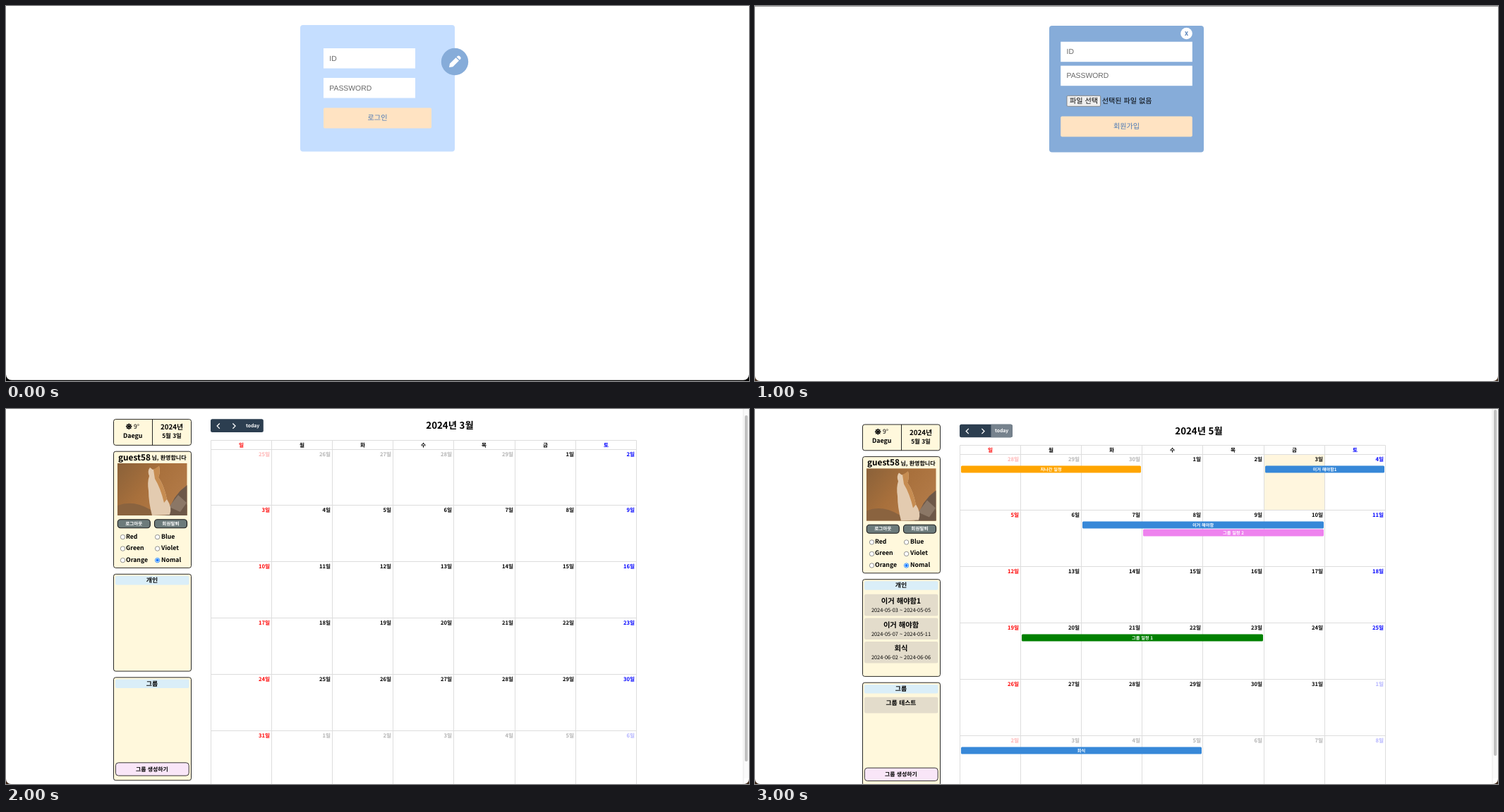
Write an HTML page that moves like this. It is 1053 px wide and 532 px high and loops after 4 s.

```html
<!DOCTYPE html>
<html lang="ko">
<head>
<meta charset="utf-8">
<style>
html, body { margin: 0; width: 100%; height: 100%; overflow: hidden; background: #fff; }
svg { display: block; width: 1053px; height: 532px; }
text { font-family: "Noto Sans CJK KR", "Noto Sans CJK", sans-serif; text-rendering: geometricPrecision; white-space: pre; }
.arial { font-family: "Liberation Sans", Arial, sans-serif; }
</style>
</head>
<body>
<svg id="stage" viewBox="0 0 1053 532"></svg>
<script>
const INK = '#000', NAVY = '#2c3e50', BLUE = '#3788d8', CREAM = '#fff8dc', SKY = '#86acd9';

const rect = (x, y, w, h, fill, rx = 0, stroke = 'none', sw = 1) =>
  `<rect x="${x}" y="${y}" width="${w}" height="${h}" rx="${rx}" fill="${fill}" stroke="${stroke}" stroke-width="${sw}"/>`;
const circle = (x, y, r, fill, stroke = 'none') =>
  `<circle cx="${x}" cy="${y}" r="${r}" fill="${fill}" stroke="${stroke}" stroke-width=".8"/>`;
const path = (d, fill, stroke = 'none', sw = 1) =>
  `<path d="${d}" fill="${fill}" stroke="${stroke}" stroke-width="${sw}"/>`;
const text = (x, y, str, size, { fill = INK, anchor = 'middle', weight = 700, cls = '' } = {}) =>
  `<text x="${x}" y="${y}" font-size="${size}" fill="${fill}" text-anchor="${anchor}" font-weight="${weight}" class="${cls}">${str}</text>`;
const shift = (dy, body) => `<g transform="translate(0 ${dy})">${body}</g>`;

// White window with rounded bottom corners on a dark desktop
const page = (desk, bottom, r) =>
  rect(0, 500, 1053, 32, desk) + rect(0, -20, 1053, bottom + 20, '#fff', r);

const field = (x, y, w, label) => rect(x, y, w, 28.5, '#fff') +
  text(x + 8.3, y + 17.7, label, 10.4, { fill: '#666', anchor: 'start', weight: 400, cls: 'arial' });
const submit = (x, y, w, label) => rect(x, y, w, 29, '#ffe3c2', 2) +
  text(526.5, y + 17.4, label, 10.1, { fill: '#4a78b4', weight: 500 });

function login() {
  return page('#000', 530.8, 8) +
    rect(417, 27, 219, 179.5, '#c5deff', 4) +
    field(450, 60, 130, 'ID') + field(450, 102, 130, 'PASSWORD') +
    submit(450, 144.5, 153, '로그인') +
    circle(636, 79, 19.2, SKY) +
    path('M628 87L629 81.8L637.6 73.2L642 77.6L633.3 86.2Z M638.6 72.2L640 70.9Q641.4 69.9 642.8 71.1L644.2 72.5Q645.3 74 644.2 75.3L642.9 76.6Z', '#fff');
}

function signup() {
  return page('#4a3524', 532, 7) +
    rect(0, 0, 1053, 1, '#999') +
    rect(417, 28, 219, 179.5, SKY, 4) +
    circle(611.5, 39, 8.3, '#fff') + text(611.5, 41.8, 'X', 8, { fill: '#4a78b4' }) +
    field(433.2, 50.7, 186.6, 'ID') + field(433.2, 84.7, 186.6, 'PASSWORD') +
    rect(442, 127.3, 47.6, 15, '#efefef', 1.5, '#767676', .8) +
    text(446, 137.6, '파일 선택', 10.1, { anchor: 'start', weight: 500 }) +
    text(491.8, 137.6, '선택된 파일 없음', 10.1, { anchor: 'start', weight: 500 }) +
    submit(433.2, 156.5, 186.6, '회원가입');
}

const box = (y, h) => rect(152.5, y, 110, h, CREAM, 3, '#111', .9);
const heading = (y, label) => rect(155, y, 104.5, 12.5, '#daeef8', 2) + text(207, y + 9.2, label, 8.9);
const greyButton = (x, label) => rect(x, 156.8, 46, 12, '#6c7b7b', 4, '#1c1c1c', 1.1) +
  text(x + 23, 165, label, 6.6, { fill: '#fff' });

function photo() {
  return rect(158, 77, 98.5, 74, 'url(#autumn)') +
    path('M158 151V137Q180 128 205 143L256.5 136V151Z', '#8a633f') +
    path('M226 151L239 126L247 116L256.5 108V151Z', '#6d5848') +
    path('M231 139L244 122L256 133L247 146Z', '#8b7766') +
    path('M203 95Q200 88 204 83L208 86L212 85L217 81Q219 90 216 97Q224 108 228 128Q236 140 232 150L207 151Q202 132 202 116Q200 104 203 95Z', '#e3cbb0') +
    path('M209 86L217 81Q219 90 216 97Q224 108 228 128L224 133Q219 112 211 99Z', '#c68c51');
}

function radios() {
  const names = ['Red', 'Blue', 'Green', 'Violet', 'Orange', 'Nomal'];
  return names.map((name, i) => {
    const right = i % 2, y = 181.6 + 16.5 * (i >> 1), on = i === 5;
    const x = right ? 214.6 : 165.5;
    return circle(x, y, 3.2, '#fff', on ? '#0075ff' : '#767676') +
      (on ? circle(x, y, 2, '#0075ff') : '') +
      text(right ? 220 : 170, y + 2, name, 8.7, { anchor: 'start' });
  }).join('');
}

function sun() {
  let rays = '';
  for (let a = 0; a < 8; a++)
    rays += `<path d="M-1.5 -2.4L0 -4.7L1.5 -2.4Z" transform="translate(174.2 24.8) rotate(${a * 45})"/>`;
  return rays + circle(174.2, 24.8, 2.9, 'none', INK) + circle(174.2, 24.8, 1.9, INK);
}

function sidebar(plans, groups) {
  const card = (y, h) => rect(155, y, 104.5, h, '#e3dccb', 2.5);
  return box(14.6, 36.8) + path('M207.5 14.6V51.4', 'none', '#111', .9) +
    sun() + text(181, 28, '9°', 8.7, { anchor: 'start', weight: 500 }) +
    text(179.7, 41, 'Daegu', 8.9) +
    text(235, 29.2, '2024년', 9.8) + text(235, 41.3, '5월 3일', 8.4) +
    box(60.2, 165.2) +
    text(159, 72.8, 'guest58', 11.8, { anchor: 'start' }) +
    text(255.5, 72.2, '님, 환영합니다', 8, { anchor: 'end' }) +
    photo() + greyButton(158.3, '로그아웃') + greyButton(210.5, '회원탈퇴') + radios() +
    box(234.3, 137.7) + heading(236.9, '개인') +
    plans.map(([name, dates], i) => {
      const y = 255.4 + 33.6 * i;
      return card(y, 30.6) + text(207, y + 13.2, name, 10.3) +
        text(207, y + 25.2, dates, 7.4, { weight: 500 });
    }).join('') +
    box(380.8, 146) + heading(383.6, '그룹') +
    groups.map(name => card(401.4, 22.6) + text(207, 412.8, name, 8.8)).join('') +
    rect(155.4, 501.8, 103.8, 18.4, '#f9e6f8', 4, '#222', .9) + text(207, 513.5, '그룹 생성하기', 7.9);
}

function toolbar(title, todayFill) {
  return rect(290, 14.3, 74.8, 18.6, NAVY, 2.5) +
    (todayFill ? path('M334.5 14.3H362.3Q364.8 14.3 364.8 16.8V30.4Q364.8 32.9 362.3 32.9H334.5Z', todayFill) : '') +
    path('M302.8 20.5L299.2 24.1L302.8 27.7M321.4 20.5L325 24.1L321.4 27.7', 'none', '#fff', 1.3) +
    text(349.6, 25.9, 'today', 6.8, { fill: '#fff' }) +
    text(629, 28.2, title, 13.3);
}

const colX = c => 290.5 + Math.round(86.1 * c);
const rowY = r => r ? 56.5 + 80 * r : 57.5;

// lead: days shown from the previous month
function grid(lead, prevDays, today) {
  let out = today === undefined ? '' :
    rect(colX(today), rowY(0), 86, 79, '#fff6de');
  let lines = `M290.5 44.5H893.5`;
  for (let r = 0; r < 6; r++) lines += `M290.5 ${rowY(r)}H893.5`;
  for (let c = 0; c < 8; c++) lines += `M${colX(c)} 44.5V540`;
  out += path(lines, 'none', '#ddd');
  [...'일월화수목금토'].forEach((day, c) => {
    const fill = c === 0 ? '#f00' : c === 6 ? '#00f' : INK;
    out += text(colX(c) + 43, 53.6, day, 7.6, { fill });
  });
  for (let i = 0; i < 42; i++) {
    const c = i % 7, n = i - lead + 1, other = n < 1 || n > 31;
    const day = n < 1 ? n + prevDays : n > 31 ? n - 31 : n;
    const fill = (other ? ['#ffb3b3', '#b3b3b3', '#b3b3ff'] : ['#f00', INK, '#00f'])[c === 0 ? 0 : c === 6 ? 2 : 1];
    out += text(colX(c + 1) - 2.5, rowY(i / 7 | 0) + 9.6, day + '일', 7.6, { fill, anchor: 'end' });
  }
  return out;
}

function event(row, from, to, label, fill, slot = 0) {
  const x = colX(from) + 1.5, w = colX(to) - colX(from) - 3, y = rowY(row) + 15.9 + 11 * slot;
  return rect(x, y, w, 10.2, fill, 1.5) + text(x + w / 2, y + 7.2, label, 6.2, { fill: '#fff' });
}

const scrollbar = y => rect(1045, 0, 8, 524, '#fafafa') + rect(1044.5, 0, 1, 532, '#e8e8e8') +
  rect(1047, y, 4.3, 491, '#c1c1c1', 2.1);

function march() {
  return page('#3b2618', 532, 7) + sidebar([], []) + toolbar('2024년 3월') + grid(5, 29) + scrollbar(9);
}

function may() {
  const plans = [
    ['이거 해야함1', '2024-05-03 ~ 2024-05-05'],
    ['이거 해야함', '2024-05-07 ~ 2024-05-11'],
    ['회식', '2024-06-02 ~ 2024-06-06']
  ];
  const events = event(0, 0, 3, '지나간 일정', '#ffa500') + event(0, 5, 7, '이거 해야함1', BLUE) +
    event(1, 2, 6, '이거 해야함', BLUE) + event(1, 3, 6, '그룹 일정 2', '#ee82ee', 1) +
    event(3, 1, 5, '그룹 일정 1', '#008000') + event(5, 0, 4, '회식', BLUE);
  return page('#3b2618', 532, 7) +
    shift(7.4, sidebar(plans, ['그룹 테스트']) + toolbar('2024년 5월', '#76828d')) +
    shift(7, grid(3, 30, 5) + events) + scrollbar(1);
}

const stage = document.getElementById('stage');
stage.innerHTML = `<defs><linearGradient id="autumn" x2="1" y2=".6">
  <stop stop-color="#8a6139"/><stop offset=".5" stop-color="#a8703c"/><stop offset="1" stop-color="#b37b48"/>
  </linearGradient></defs>` +
  [login, signup, march, may].map(scene => `<g class="scene">${scene()}</g>`).join('');

const scenes = stage.querySelectorAll('.scene');
const start = performance.now();
function draw(now) {
  const current = Math.floor(Math.max(0, now - start) % 4000 / 1000);
  scenes.forEach((g, i) => g.style.display = i === current ? '' : 'none');
  requestAnimationFrame(draw);
}
draw(start);
</script>
</body>
</html>
```
